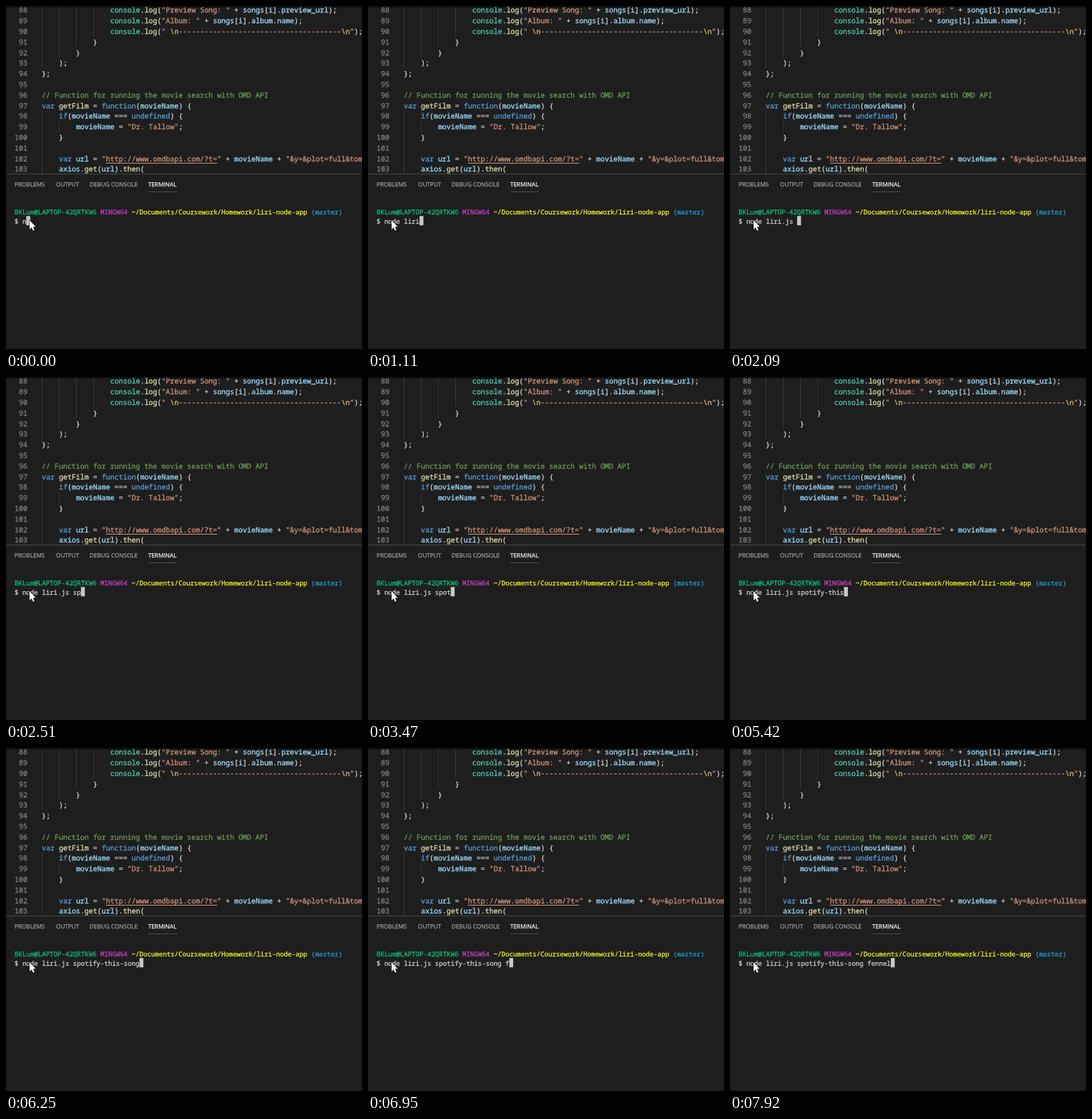
These frames come from a looping animation (498x479 px, 8000 ms). An HTML page with a canvas:

```html
<!DOCTYPE html>
<html lang="en">
<head>
<meta charset="utf-8">
<title>Terminal typing</title>
<style>
  html, body { margin: 0; width: 100%; height: 100%; overflow: hidden; background: #1e1e1e; }
  canvas { display: block; width: 498px; height: 479px; }
</style>
</head>
<body>
<canvas id="stage" width="498" height="479"></canvas>
<script>
const ctx = document.getElementById('stage').getContext('2d');
const LOOP = 8000;
const MONO = '"Noto Sans Mono", "DejaVu Sans Mono", monospace';
const CODE = { x: 50, y: 9.3, line: 14.8, pitch: 5.985, first: 88 };
const TERM = { x: 12, y: 290.6, line: 13, pitch: 5.46 };

const source = [
  '                console.log("Preview Song: " + songs[i].preview_url);',
  '                console.log("Album: " + songs[i].album.name);',
  '                console.log(" \\n' + '-'.repeat(38) + '\\n");',
  '            }',
  '        }',
  '    );',
  '};',
  '',
  '// Function for running the movie search with OMD API',
  'var getFilm = function(movieName) {',
  '    if(movieName === undefined) {',
  '        movieName = "Dr. Tallow";',
  '    }',
  '',
  '    var url = "http://www.omdbapi.com/?t=" + movieName + "&y=&plot=full&tom',
  '    axios.get(url).then('
];

// Indent guides: column, first row, row count
const guides = [
  [0, 0, 6], [4, 0, 5], [8, 0, 4], [12, 0, 3],
  [0, 10, 3], [4, 11, 1], [0, 13, 3]
];

const tabs = [['PROBLEMS', 12], ['OUTPUT', 70], ['DEBUG CONSOLE', 117], ['TERMINAL', 199]];

const prompt = [
  ['BKLum@LAPTOP-42QRTKW6 ', '#0dbc79'],
  ['MINGW64 ', '#bc3fbc'],
  ['~/Documents/Coursework/Homework/liri-node-app ', '#efef22'],
  ['(master)', '#1c9fd0']
];

const command = 'node liri.js spotify-this-song fennel';
// Time of each key press after the first letter
const keyTimes = [
  100, 240, 370, 500, 640, 780, 920, 1110,
  1250, 1390, 1390, 2090,
  2230, 2510, 3200, 3470, 3610, 3890, 4170,
  4720, 5000, 5140, 5280, 5420,
  5560, 5830, 5970, 6110, 6250, 6530,
  6950, 7080, 7220, 7360, 7640, 7920
];

const TOKEN = /\/\/.*|"[^"]*"?|[A-Za-z_]\w*|[^\w"\/]+/g;

function tokenColor(token, next) {
  if (token.startsWith('//')) return '#6a9955';
  if (token[0] === '"') return '#ce9178';
  if (/^(var|function|undefined|if)$/.test(token)) return '#569cd6';
  if (token === 'console') return '#4ec9b0';
  if (token === 'getFilm' || (next === '(' && /^\w/.test(token))) return '#dcdcaa';
  return /^\w/.test(token) ? '#9cdcfe' : '#d4d4d4';
}

// A hairline stroke gives the text the denser look of screen-hinted type
function write(text, x, y, color) {
  ctx.fillStyle = ctx.strokeStyle = color;
  ctx.lineWidth = 0.3;
  ctx.fillText(text, x, y);
  ctx.strokeText(text, x, y);
}

function setFont(size, family) {
  ctx.font = `${size}px ${family}`;
  ctx.textRendering = 'geometricPrecision';
}

function drawCodeLine(line, y) {
  for (const match of line.matchAll(TOKEN)) {
    const token = match[0];
    const color = tokenColor(token, line[match.index + token.length]);
    let col = match.index;
    for (const part of token.split(/(\\n)/)) {
      write(part, CODE.x + col * CODE.pitch, y, part === '\\n' ? '#d7ba7d' : color);
      col += part.length;
    }
    if (token.includes('http')) {
      ctx.fillStyle = color;
      ctx.fillRect(CODE.x + (match.index + 1) * CODE.pitch, Math.round(y + 2), (token.length - 2) * CODE.pitch, 1);
    }
  }
}

function drawEditor() {
  ctx.save();
  ctx.beginPath();
  ctx.rect(0, 0, 498, 234);
  ctx.clip();
  ctx.fillStyle = '#363636';
  for (const [col, row, count] of guides) {
    ctx.fillRect(Math.round(CODE.x + col * CODE.pitch), row * CODE.line - 1.6, 1, count * CODE.line);
  }
  setFont(CODE.pitch / 0.6, MONO);
  source.forEach((line, i) => {
    const y = CODE.y + i * CODE.line;
    ctx.textAlign = 'right';
    write(String(CODE.first + i), 30, y, '#808080');
    ctx.textAlign = 'left';
    drawCodeLine(line, y);
  });
  const shadow = ctx.createLinearGradient(0, 0, 0, 3);
  shadow.addColorStop(0, 'rgba(0,0,0,0.7)');
  shadow.addColorStop(1, 'rgba(0,0,0,0)');
  ctx.fillStyle = shadow;
  ctx.fillRect(0, 0, 498, 3);
  ctx.restore();
}

function drawTabs() {
  ctx.fillStyle = '#444444';
  ctx.fillRect(0, 234, 498, 1);
  setFont(8.2, '"Open Sans", "Noto Sans", sans-serif');
  for (const [label, x] of tabs) {
    write(label, x, 252.2, label === 'TERMINAL' ? '#e7e7e7' : '#989898');
  }
  ctx.fillStyle = '#4c4c4c';
  ctx.fillRect(199, 259, 40, 1);
}

function drawTerminal(time) {
  setFont(TERM.pitch / 0.6, MONO);
  let col = 0;
  for (const [text, color] of prompt) {
    write(text, TERM.x + col * TERM.pitch, TERM.y, color);
    col += text.length;
  }
  const typed = 1 + keyTimes.filter(t => t <= time).length;
  const text = '$ ' + command.slice(0, typed);
  write(text, TERM.x, TERM.y + TERM.line, '#cccccc');
  ctx.fillStyle = '#c8c8c8';
  ctx.fillRect(TERM.x + text.length * TERM.pitch, 293.3, TERM.pitch, 13);
}

function drawPointer() {
  const points = [[33, 299.3], [33, 312], [35.8, 309.3], [37.8, 313.8], [39.8, 312.9], [37.9, 308.6], [41.5, 308.3]];
  ctx.beginPath();
  points.forEach(([x, y]) => ctx.lineTo(x, y));
  ctx.closePath();
  ctx.lineWidth = 1;
  ctx.strokeStyle = '#000';
  ctx.stroke();
  ctx.fillStyle = '#fff';
  ctx.fill();
}

function draw(now) {
  ctx.fillStyle = '#1e1e1e';
  ctx.fillRect(0, 0, 498, 479);
  drawEditor();
  drawTabs();
  drawTerminal(now % LOOP);
  drawPointer();
}

const start = performance.now();
function tick() {
  draw(performance.now() - start);
  requestAnimationFrame(tick);
}
tick();
</script>
</body>
</html>
```
